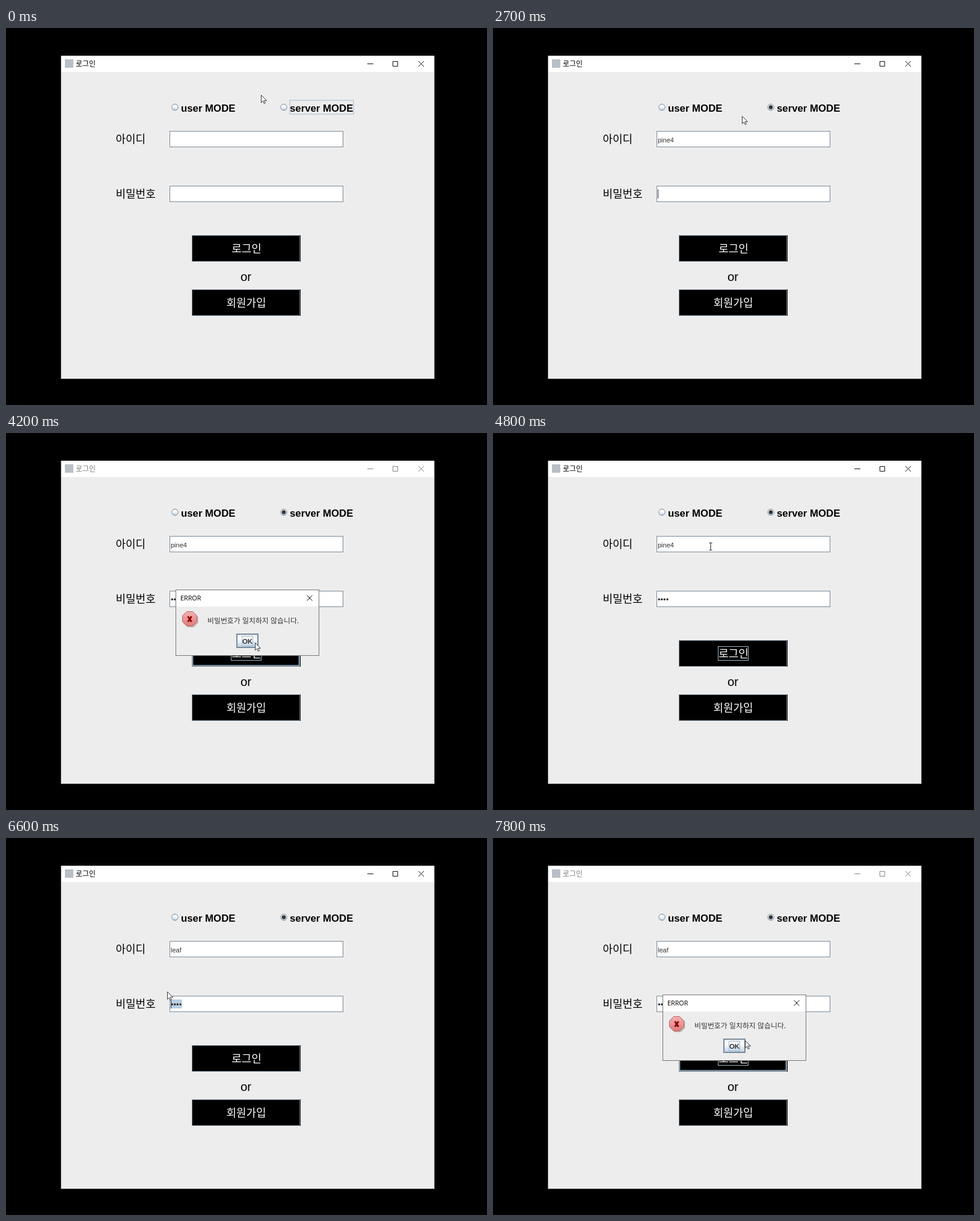
Write an HTML page that moves like this. It is 800 px wide and 626 px high and loops after 8 s.

```html
<!DOCTYPE html>
<html lang="ko">
<head>
<meta charset="utf-8">
<title>로그인</title>
<style>
  html, body { margin: 0; width: 100%; height: 100%; overflow: hidden; background: #000; }
  svg { display: block; }
  text { font-family: "Liberation Sans", Arial, "Noto Sans CJK KR", "Noto Sans CJK", sans-serif; white-space: pre; }
  .ko { font: 500 18px "Noto Sans CJK KR", "Noto Sans CJK", sans-serif; }
  .mode { font-weight: bold; font-size: 16.8px; }
  .field { fill: #fff; stroke: #7a8a99; }
  .in { font-size: 11px; fill: #333; }
  .focus { fill: none; stroke: #a3b8cc; }
  .line { fill: none; stroke: #111; }
  .mid { text-anchor: middle; }
</style>
</head>
<body>
<svg width="800" height="626" viewBox="0 0 800 626">
  <defs>
    <linearGradient id="metal" x2="0" y2="1">
      <stop offset="0" stop-color="#e4edf5"/><stop offset=".35" stop-color="#fff"/><stop offset="1" stop-color="#b8cfe5"/>
    </linearGradient>
    <linearGradient id="red" x2="0" y2="1">
      <stop offset="0" stop-color="#f2b0b0"/><stop offset="1" stop-color="#e07c7c"/>
    </linearGradient>
  </defs>

  <rect x="91.5" y="46.5" width="621" height="536" fill="#ededed" stroke="#777"/>
  <rect x="92" y="46" width="620" height="27" fill="#fff"/>
  <rect x="98" y="52" width="14" height="14" fill="#b9bfc6"/>
  <g id="bar">
    <text class="ko" x="116" y="64" style="font-size:12px;font-weight:400">로그인</text>
    <path class="line" d="M601 59.5h10M643.5 55.5h8v8h-8zM686 55l9 9m0-9l-9 9"/>
  </g>

  <g fill="url(#metal)" stroke="#7a8a99">
    <circle cx="281" cy="131.5" r="5.2"/>
    <circle cx="462" cy="131.5" r="5.2"/>
  </g>
  <circle id="dot" cx="462" cy="131.5" r="3.3" fill="#333"/>
  <text class="mode" x="291" y="138.5">user MODE</text>
  <text class="mode" x="472" y="138.5">server MODE</text>
  <rect id="serverFocus" class="focus" x="472" y="120" width="106" height="23"/>

  <text class="ko" x="182.5" y="191.4">아이디</text>
  <text class="ko" x="182.5" y="282">비밀번호</text>
  <rect class="field" x="272.5" y="171.5" width="288" height="26"/>
  <rect class="field" x="272.5" y="262.5" width="288" height="26"/>
  <rect id="mark" x="274" height="15" fill="#b8cfe5"/>
  <text id="name" class="in" x="274" y="190"></text>
  <text id="pass" class="in" x="274" y="281.3" style="font-size:13px"></text>
  <path id="caret" stroke="#333"/>

  <rect id="login" x="309" y="344" width="181" height="44"/>
  <path d="M489.5 344v44" stroke="#000"/>
  <rect class="field" x="309.5" y="344.5" width="179" height="43" style="fill:none"/>
  <path id="press" d="M309 345.5h179" stroke="#7a8a99" stroke-width="2"/>
  <rect id="hover" x="310.5" y="345.5" width="177" height="40.5" fill="none" stroke="#9bb6cc" stroke-width="1.5"/>
  <text class="ko mid" x="400" y="373" fill="#fff">로그인</text>
  <rect id="loginFocus" class="focus" x="374.5" y="354.5" width="50" height="23"/>
  <text class="mid" x="399" y="419.5" font-size="20.5">or</text>
  <rect x="309" y="434" width="181" height="44"/>
  <rect class="field" x="309.5" y="434.5" width="179" height="43" style="fill:none"/>
  <text class="ko mid" x="399.5" y="463.4" fill="#fff">회원가입</text>

  <g id="dialog">
    <rect x="282.5" y="260.5" width="238" height="109" fill="#ededed" stroke="#777"/>
    <rect x="283" y="261" width="237" height="27" fill="#fff"/>
    <text x="290" y="278" style="font:10.8px 'Open Sans',sans-serif">ERROR</text>
    <path class="line" d="M500.5 269.5l9 9m0-9l-9 9"/>
    <path id="oct" d="M302.500 298.500h10l7 7v10l-7 7h-10l-7-7v-10z" fill="#bbb"/>
    <path d="M300.500 296.500h10l7 7v10l-7 7h-10l-7-7v-10z" fill="url(#red)" stroke="#b86060"/>
    <path d="M302.500 304.500l6 9m0-9l-6 9" stroke="#8c0000" stroke-width="3"/>
    <text class="ko" x="335" y="315.5" fill="#333" style="font-size:11.9px">비밀번호가 일치하지 않습니다.</text>
    <rect x="384" y="334" width="35" height="22" fill="url(#metal)" stroke="#7a8a99" stroke-width="2"/>
    <rect class="focus" x="392.5" y="337.5" width="18" height="16"/>
    <text class="mid" x="401.5" y="350" fill="#333" font-size="11.5" font-weight="bold">OK</text>
  </g>

  <path id="arrow" d="M.5 .5v12.300l2.900-2.700 1.900 4.300 2-.9-1.900-4.100h4z" fill="#fff" stroke="#222" stroke-width=".9"/>
  <path id="beam" class="line" d="M-2.500-5.500h2l.5.500.5-.5h2M0-5v11M-2.500 6.500h2l.5-.5.5.5h2"/>
</svg>
<script>
const $ = id => document.getElementById(id);
const STEP = 300;

// Each entry changes only what it names; the rest carries over.
const script = [
  { at: [424, 111], beam: 0, picked: 0, focus: "server", name: "", dots: 0,
    sel: 0, press: 0, hover: 0, dialog: 0 },
  { at: [446, 119] },
  { at: [461, 130], picked: 1 },
  { at: [446, 144] },
  { at: [404, 184], beam: 1, focus: "name" },
  { at: [410, 148], beam: 0 },
  { name: "pin" },
  { name: "pine4" },
  { at: [414, 146] },
  { focus: "pass" },
  { dots: 2 },
  { dots: 4 },
  { at: [414, 325] },
  { at: [414, 348], focus: "login", press: 1 },
  { press: 0, hover: 1, dialog: 1 },
  { at: [404, 306], hover: 0, dialog: 0 },
  { at: [362, 188], beam: 1 },
  { at: [318, 187], focus: "name" },
  { at: [266, 184], beam: 0, sel: 1 },
  { name: "le", sel: 0 },
  { name: "leaf" },
  { at: [306, 274], beam: 1, focus: "pass" },
  { at: [268, 255], beam: 0, sel: 1 },
  { dots: 2, sel: 0 },
  { at: [350, 310], dots: 4 },
  { at: [418, 350], focus: "login", press: 1 },
  { at: [419, 336], press: 0, hover: 1, dialog: 1 }
];
const states = [];
script.forEach((change, i) => states.push({ ...states[i - 1], ...change }));

const show = (id, on) => $(id).style.display = on ? "" : "none";

function draw(s) {
  $("name").textContent = s.name;
  $("pass").textContent = "•".repeat(s.dots);
  const typing = s.focus === "name" || s.focus === "pass";
  if (typing) {
    const top = s.focus === "name" ? 177.5 : 268;
    const width = $(s.focus).getComputedTextLength();
    $("caret").setAttribute("d", `M${274.5 + (s.sel ? 0 : Math.round(width))} ${top}v15`);
    $("mark").setAttribute("y", top);
    $("mark").setAttribute("width", width + .5);
  }
  show("caret", typing);
  show("mark", typing && s.sel);
  show("dot", s.picked);
  show("serverFocus", s.focus === "server");
  show("loginFocus", s.focus === "login");
  $("login").setAttribute("fill", s.press ? "#b8cfe5" : "#000");
  show("press", s.press);
  show("hover", s.hover);
  show("dialog", s.dialog);
  $("bar").setAttribute("opacity", s.dialog ? .5 : 1);
  show("arrow", !s.beam);
  show("beam", s.beam);
  $(s.beam ? "beam" : "arrow").setAttribute("transform", `translate(${s.at})`);
}

const start = performance.now();
let last = -1;
function tick() {
  const i = Math.floor((performance.now() - start) % 8000 / STEP);
  if (i !== last) draw(states[last = i]);
  requestAnimationFrame(tick);
}
tick();
</script>
</body>
</html>
```
